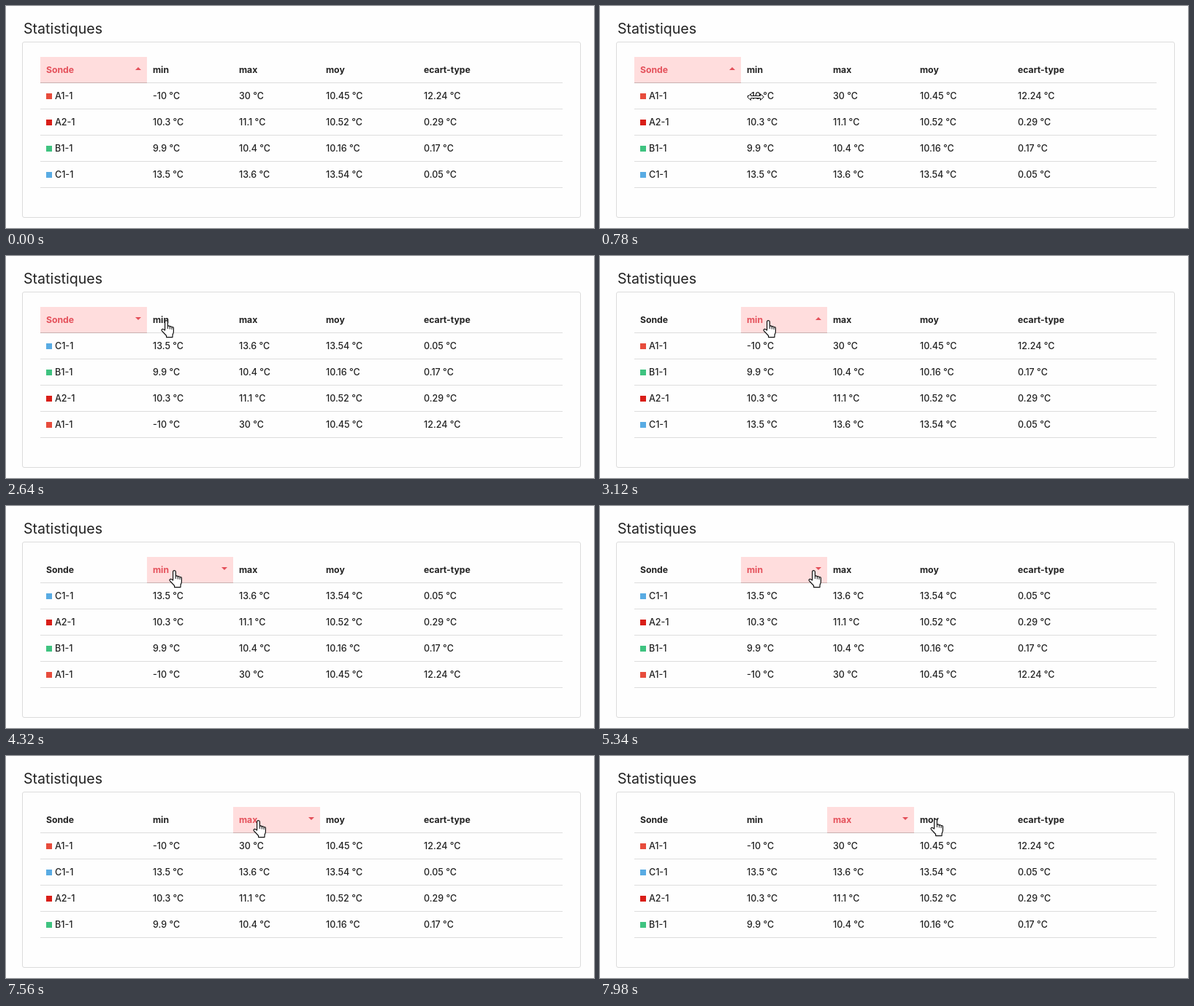
An HTML page for the animation above (8000 ms loop, 805 by 305 pixels).

```html
<!DOCTYPE html>
<html lang="fr">
<head>
<meta charset="utf-8">
<style>
  html, body { margin: 0; width: 100%; height: 100%; overflow: hidden; background: #fefefe; }
  body { position: relative; color: #222; font: 500 12.5px/35px Inter, "Open Sans", sans-serif; }
  div, span, i, svg { position: absolute; box-sizing: border-box; white-space: nowrap; }
  #title { left: 24px; top: 14px; font-size: 19.6px; font-weight: 400; }
  #panel { left: 22px; top: 49px; width: 765px; height: 242px; border: 1px solid #dcdcdc; border-radius: 3px; }
  .row { left: 47px; width: 715px; height: 36px; border-bottom: 1px solid #ddd; }
  #head { top: 70px; font-size: 12.2px; font-weight: 700; }
  #head span { height: 36px; padding-left: 8px; }
  #head .on { background: #fdd; color: #e4505a; border-bottom: 1px solid #c8b0b0; }
  #head .on::after { content: ""; position: absolute; right: 8px; top: 14px; border: 4px solid transparent; border-top: 0; border-bottom-color: #e4505a; }
  #head .desc::after { border-top: 4px solid #e4505a; border-bottom: 0; }
  i { left: 8px; top: 14px; width: 8px; height: 8px; }
  svg { left: 0; top: 0; overflow: visible; fill: #fff; stroke: #111; stroke-linejoin: round; }
</style>
</head>
<body>
<div id="title">Statistiques</div>
<div id="panel"></div>
<div id="head" class="row"></div>
<svg id="arrow" width="13" height="20"><path d="M.5 .8V16.5L4.2 13 6.7 19 9.2 18 6.8 12.2H12z"/></svg>
<svg id="resize" width="24" height="10"><path d="M.7 5 5.5 .7V3.5H18.5V.7L23.3 5 18.5 9.3V6.5H5.5V9.3z"/></svg>
<svg id="hand" width="18" height="25">
  <path stroke-width="1.2" d="M5.6 14V2.6a1.9 1.9 0 0 1 3.8 0V8.6a1.6 1.6 0 0 1 2.9.7 1.5 1.5 0 0 1 2.7.8 1.4 1.4 0 0 1 2.4 1.2V16c0 2.2-1.4 3.4-1.4 5.5V23.6H7.6V21.5L1.4 14.8c-1.2-1.8.8-3.2 2.3-2z"/>
  <path fill="none" d="M9.4 8.6V12M12.3 9.5V12.5M15 10.5V13"/>
</svg>
<script>
const LOOP = 8000, STEP = 60;
const columns = [
  { name: "Sonde", x: 0, w: 146 }, { name: "min", x: 146, w: 118 }, { name: "max", x: 264, w: 119 },
  { name: "moy", x: 383, w: 134 }, { name: "ecart-type", x: 517, w: 198 }
];
const probes = [
  { color: "#e74c3c", cells: ["A1-1", "-10", "30", "10.45", "12.24"] },
  { color: "#d91e18", cells: ["A2-1", "10.3", "11.1", "10.52", "0.29"] },
  { color: "#3fc380", cells: ["B1-1", "9.9", "10.4", "10.16", "0.17"] },
  { color: "#59abe3", cells: ["C1-1", "13.5", "13.6", "13.54", "0.05"] }
];
// each column is sorted up, then down, before the next one
const clicks = [0, 1860, 3120, 4320, 5940, 6780];
const moves = [
  { at: 900, ms: 300, x: 166, y: 88 }, { at: 2340, ms: 420, x: 223, y: 88 },
  { at: 4980, ms: 660, x: 333, y: 88 }, { at: 7500, ms: 480, x: 452, y: 86 }
];

const $ = id => document.getElementById(id);
function add(parent, tag, text = "") {
  const el = document.createElement(tag);
  el.textContent = text;
  return parent.appendChild(el);
}

const heads = columns.map(({ name, x, w }) => {
  const el = add($("head"), "span", name);
  el.style.left = x + "px";
  el.style.width = w + "px";
  return el;
});

for (const p of probes) {
  p.row = document.createElement("div");
  p.row.className = "row";
  $("arrow").before(p.row);
  add(p.row, "i").style.background = p.color;
  p.cells.forEach((text, c) => {
    const cell = add(p.row, "span", c ? text + " °C" : text);
    cell.style.left = columns[c].x + (c ? 8 : 20) + "px";
  });
}

function showTable(t) {
  const n = clicks.filter(c => c <= t).length - 1;
  const col = n >> 1, down = n % 2;
  heads.forEach((h, c) => h.className = c !== col ? "" : down ? "on desc" : "on");
  const sorted = [...probes].sort((a, b) => col
    ? a.cells[col] - b.cells[col]
    : a.cells[0].localeCompare(b.cells[0]));
  if (down) sorted.reverse();
  sorted.forEach((p, i) => p.row.style.top = 106 + 36 * i + "px");
}

// sweeps in from the right edge along a sagging curve
function entry(t) {
  const u = (t - 120) / 780;
  const x = 188.5 + 600 * (1 - u) ** 1.7;
  const y = 88 + 33 * u + 40 * Math.sin(Math.PI * u) ** 2;
  return x > 240 ? ["arrow", x, y] : ["resize", x - 12, y - 5];
}

function hover(t) {
  let x = 178, y = 99;
  for (const m of moves) {
    const u = Math.min(1, Math.max(0, (t - m.at) / m.ms));
    const k = u * u * (3 - 2 * u);
    x += (m.x - x) * k;
    y += (m.y - y) * k;
  }
  return ["hand", x, y];
}

function showCursor(t) {
  const [kind, x, y] = t < 120 ? [] : t <= 900 ? entry(t) : hover(t);
  for (const id of ["arrow", "resize", "hand"]) $(id).style.display = id === kind ? "block" : "none";
  if (kind) $(kind).style.transform = `translate(${Math.round(x)}px, ${Math.round(y)}px)`;
}

function draw() {
  const t = Math.floor(performance.now() % LOOP / STEP) * STEP;
  showTable(t);
  showCursor(t);
  requestAnimationFrame(draw);
}
draw();
</script>
</body>
</html>
```
